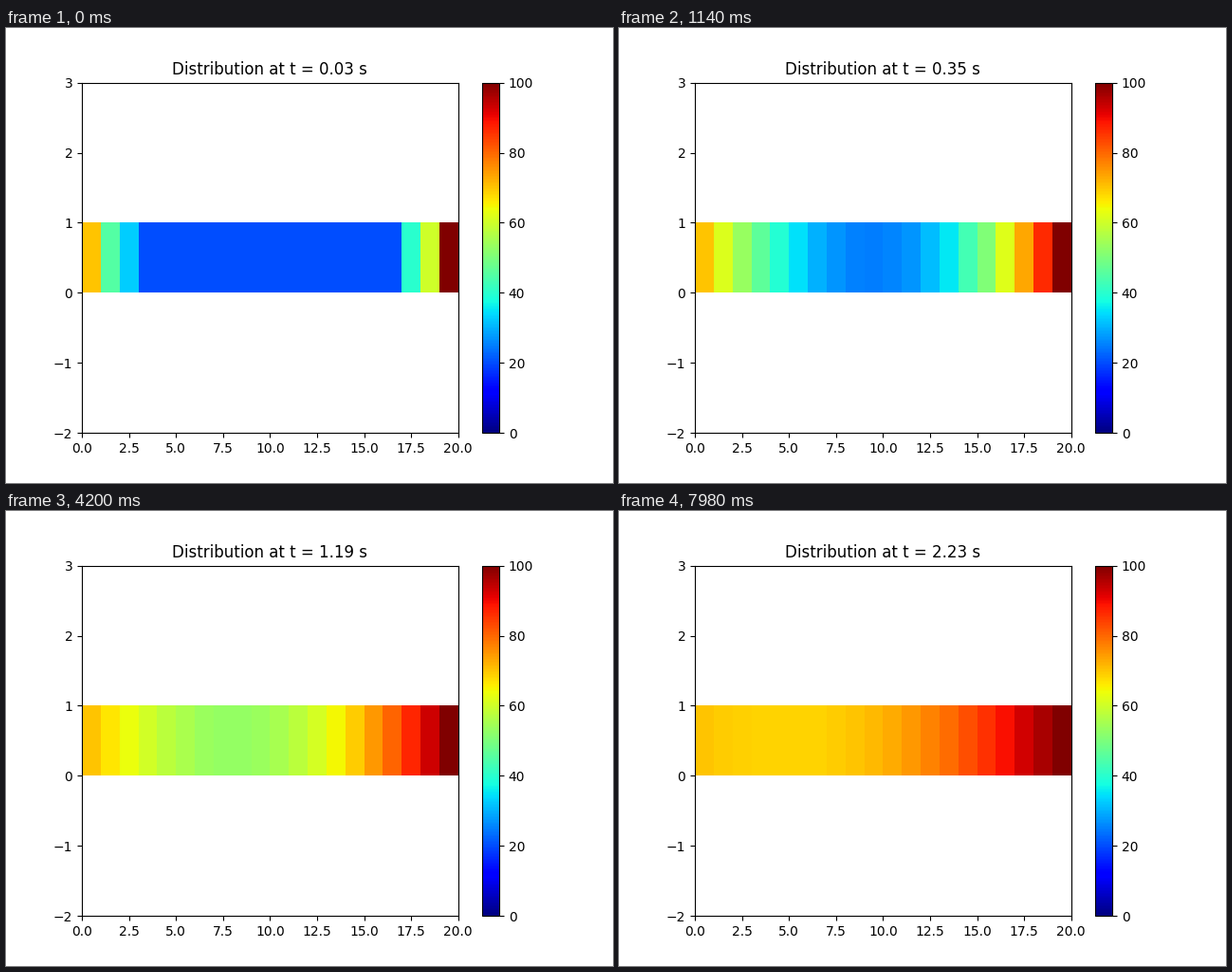
Animation of 640 by 480 pixels, one loop 8 s. Source, as a matplotlib script:

```python
import numpy as np
import matplotlib.pyplot as plt
from matplotlib.animation import FuncAnimation

DIFFUSIVITY = 210
LENGTH = 50
NODES = 20
STEPS = 134          # simulation steps shown per loop
TICK_MS = 20         # animation tick
TICKS_PER_STEP = 3   # each step stays for 60 ms
TICKS = 400

dx = LENGTH / (NODES - 1)
dt = 0.5 * dx ** 2 / DIFFUSIVITY


def diffuse(u):
    """One explicit step of the heat equation with fixed ends."""
    new = u.copy()
    new[1:-1] += DIFFUSIVITY * dt / dx ** 2 * (u[:-2] - 2 * u[1:-1] + u[2:])
    return new


def simulate():
    u = np.full(NODES, 20.0)
    u[0], u[-1] = 70, 100
    states = [u]
    for _ in range(STEPS + 1):
        states.append(diffuse(states[-1]))
    return states


states = simulate()

fig, ax = plt.subplots(figsize=(6.4, 4.8), dpi=100)
mesh = ax.pcolormesh([states[2]], cmap="jet", vmin=0, vmax=100)
fig.colorbar(mesh, ax=ax)
ax.set_ylim(-2, 3)
title = ax.set_title("")


def update(tick):
    step = tick // TICKS_PER_STEP + 2
    mesh.set_array(states[step][np.newaxis, :])
    title.set_text(f"Distribution at t = {step * dt:.2f} s")
    return mesh, title


anim = FuncAnimation(fig, update, frames=TICKS, interval=TICK_MS,
                     init_func=lambda: update(0), repeat=True, repeat_delay=0)
plt.show()
```
